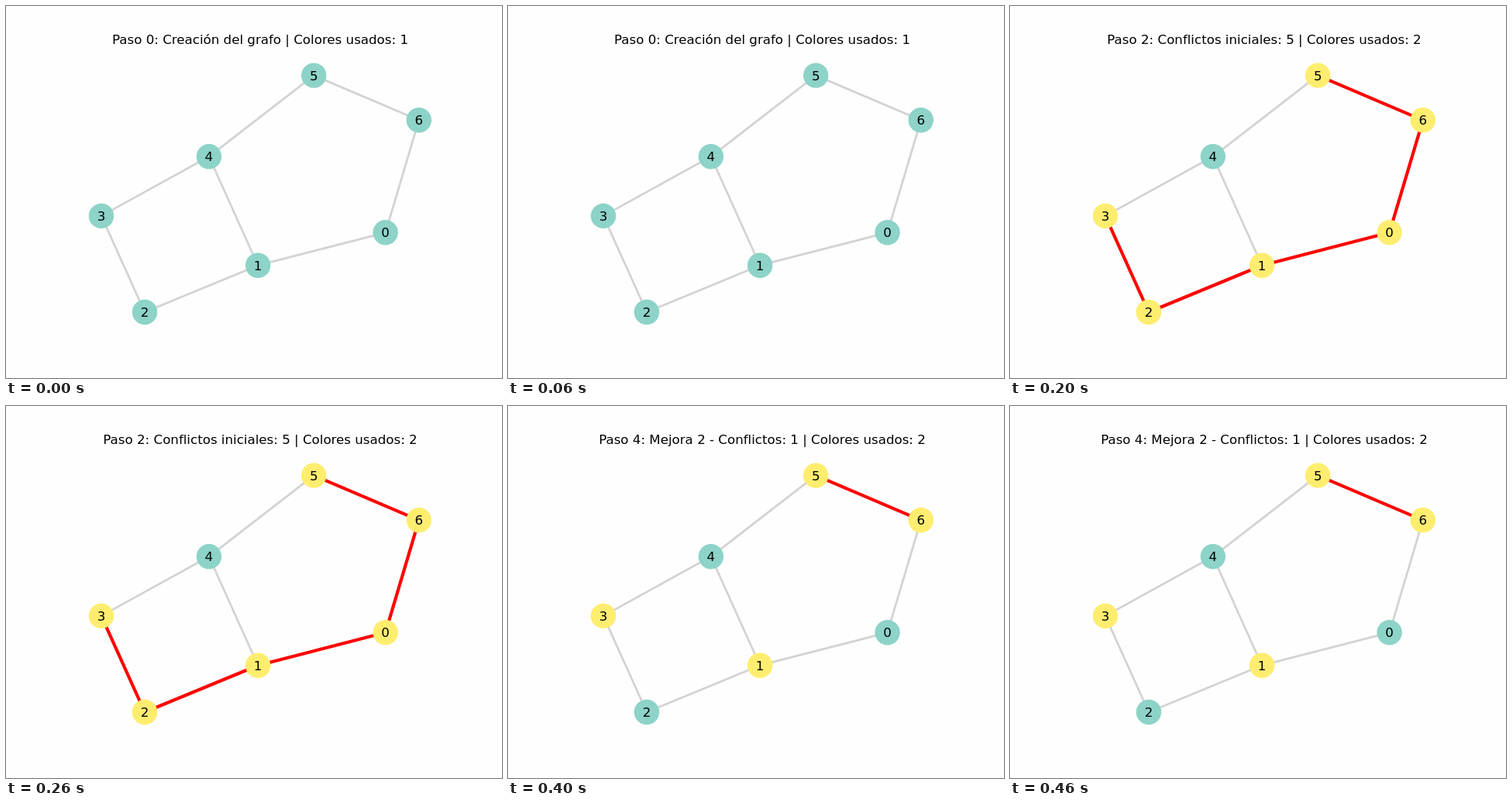
These frames come from a looping animation (640x480 px, 500 ms). An HTML page with a canvas:

```html
<!DOCTYPE html>
<html lang="es">
<head>
<meta charset="utf-8">
<title>Coloración de grafo</title>
<style>
  html, body { margin: 0; width: 100%; height: 100%; overflow: hidden; background: #fefefe; }
  canvas { display: block; }
</style>
</head>
<body>
<canvas id="stage" width="640" height="480"></canvas>
<script>
const ctx = document.getElementById('stage').getContext('2d');
const STEP_MS = 100;
const TEAL = '#8dd3c7', YELLOW = '#ffed6f';
const POINT = 100 / 72; // pixels per typographic point

const nodes = [
  [489.6, 292.3], [325.1, 334.7], [179, 395], [123, 270.9],
  [261.9, 194.3], [397.2, 89.6], [532.8, 147.3]
];
const edges = [[0, 1], [1, 2], [2, 3], [3, 4], [1, 4], [4, 5], [5, 6], [6, 0]];

// Each step lists the nodes that carry the first colour.
const steps = [
  { title: 'Creación del grafo', teal: [0, 1, 2, 3, 4, 5, 6], colors: 1 },
  { title: 'Coloración inicial aleatoria', teal: [4], colors: 2 },
  { title: 'Conflictos iniciales: 5', teal: [4], colors: 2 },
  { title: 'Mejora 1 - Conflictos: 3', teal: [0, 4], colors: 2 },
  { title: 'Mejora 2 - Conflictos: 1', teal: [0, 2, 4], colors: 2 }
];

function drawEdge([a, b], color, width) {
  ctx.strokeStyle = color;
  ctx.lineWidth = width * POINT;
  ctx.beginPath();
  ctx.moveTo(...nodes[a]);
  ctx.lineTo(...nodes[b]);
  ctx.stroke();
}

function drawNode([x, y], color) {
  ctx.fillStyle = color;
  ctx.beginPath();
  ctx.arc(x, y, (Math.sqrt(500) + 1) / 2 * POINT, 0, Math.PI * 2);
  ctx.fill();
}

function drawStep(index) {
  const { title, teal, colors } = steps[index];
  const isTeal = i => teal.includes(i);
  const inConflict = ([a, b]) => colors > 1 && isTeal(a) === isTeal(b);

  ctx.fillStyle = '#fefefe';
  ctx.fillRect(0, 0, 640, 480);
  edges.forEach(e => drawEdge(e, '#d3d3d3', 2));
  edges.filter(inConflict).forEach(e => drawEdge(e, '#ff0000', 3));
  nodes.forEach((p, i) => drawNode(p, isTeal(i) ? TEAL : YELLOW));

  ctx.fillStyle = '#000';
  ctx.font = `${12 * POINT}px "DejaVu Sans", sans-serif`;
  ctx.letterSpacing = '0.001px'; // keeps "fl" from joining
  ctx.textAlign = 'center';
  ctx.textBaseline = 'alphabetic';
  ctx.fillText(`Paso ${index}: ${title} | Colores usados: ${colors}`, 328, 49);
  nodes.forEach(([x, y], i) => ctx.fillText(i, x, Math.round(y + 6)));
}

const start = performance.now();
function tick() {
  const elapsed = performance.now() - start;
  drawStep(Math.floor(elapsed / STEP_MS) % steps.length);
  requestAnimationFrame(tick);
}
tick();
</script>
</body>
</html>
```
